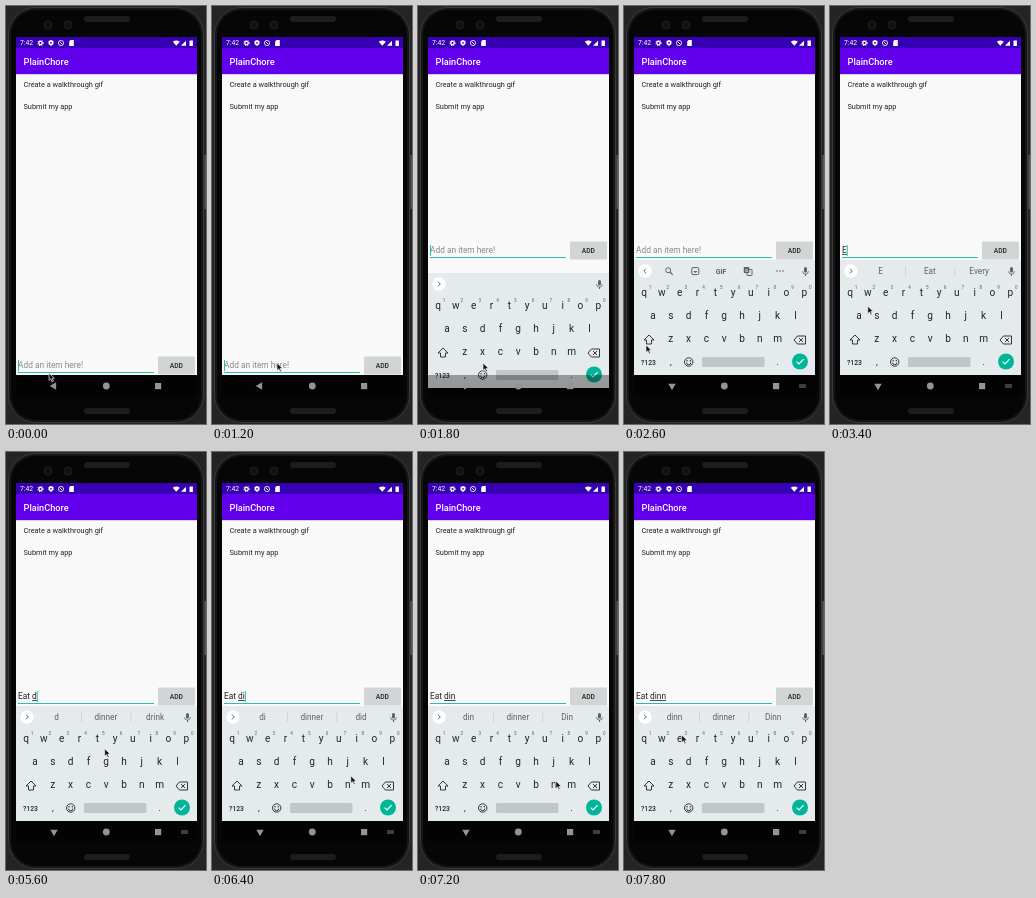
These frames come from a looping animation (200 px wide and 418 px high, 8000 ms). An HTML page with a canvas:

```html
<!DOCTYPE html>
<html lang="en">
<head>
<meta charset="utf-8">
<title>Todo list</title>
<style>
html, body { margin: 0; width: 100%; height: 100%; overflow: hidden; background: #191919; }
canvas { display: block; width: 200px; height: 418px; }
</style>
</head>
<body>
<canvas></canvas>
<script>
const LOOP = 8000, STEP = 200;
const TEAL = '#2bbdb0', INK = '#202528', GREY = '#5b6164', PANEL = '#e5eaec';
const LEFT = 10, WIDTH = 181, NAV_TOP = 369, PANEL_HEIGHT = 115;
const PANEL_TOP = NAV_TOP - PANEL_HEIGHT;

// The story in ms: tap the field, open the toolbar, press shift, then type at an even beat
const TAP_AT = 700, OPEN_AT = 1800, TOOLBAR_AT = 2200, SHIFT_AT = 2700;
const TYPE_AT = 3130, BEAT = 585, TRAVEL = 450;
const PHRASE = 'Eat dinne';
const GUESSES = {
  'E': ['Eat', 'Every'], 'Ea': ['EA', 'Early'], 'Eat': ['East', 'Eating'], 'Eat ': ['at', 'and'],
  'Eat d': ['dinner', 'drink'], 'Eat di': ['dinner', 'did'],
  'Eat din': ['dinner', 'Din'], 'Eat dinn': ['dinner', 'Dinn']
};

const KEY_GAP = 17.8, ROW_GAP = 23;
const keys = {};
['qwertyuiop', 'asdfghjkl', 'zxcvbnm'].forEach((letters, row) => {
  const first = 100.2 - (letters.length - 1) * KEY_GAP / 2;
  [...letters].forEach((letter, i) => {
    keys[letter] = { x: first + i * KEY_GAP, y: PANEL_TOP + 33 + row * ROW_GAP };
  });
});
const SPACE = { x: 109, y: PANEL_TOP + 102 };
const SHIFT = { x: 25, y: keys.z.y + 1 };

const stops = [
  { leave: 0, x: 43, y: 367 },
  { leave: TAP_AT, x: 65, y: 357 },
  { leave: OPEN_AT + STEP / 2, x: 22, y: 339 },
  ...[...PHRASE].map((char, i) => {
    const key = keys[char.toLowerCase()] || SPACE;
    return { leave: i ? TYPE_AT + (i - 1) * BEAT : SHIFT_AT, x: key.x + 2, y: key.y - 4 };
  })
];

const canvas = document.querySelector('canvas');
const c = canvas.getContext('2d');
const dpr = window.devicePixelRatio || 1;
canvas.width = 200 * dpr;
canvas.height = 418 * dpr;

function paint(fill, stroke, width = 1) {
  if (fill) { c.fillStyle = fill; c.fill(); }
  if (stroke) { c.strokeStyle = stroke; c.lineWidth = width; c.stroke(); }
}

function rect(x, y, w, h, color) {
  c.fillStyle = color;
  c.fillRect(x, y, w, h);
}

function round(x, y, w, h, r, ...style) {
  c.beginPath();
  c.roundRect(x, y, w, h, r);
  paint(...style);
}

function arc(x, y, r, from, to, ...style) {
  c.beginPath();
  c.arc(x, y, r, from, to);
  paint(...style);
}

function circle(x, y, r, ...style) {
  arc(x, y, r, 0, Math.PI * 2, ...style);
}

// Vector shape written as path data around a centre
function glyph(x, y, data, ...style) {
  c.save();
  c.translate(x, y);
  const path = new Path2D(data);
  const [fill, stroke, width = 1] = style;
  if (fill) { c.fillStyle = fill; c.fill(path); }
  if (stroke) { c.strokeStyle = stroke; c.lineWidth = width; c.stroke(path); }
  c.restore();
}

function triangle(x, y, r, angle, color) {
  c.beginPath();
  for (let i = 0; i < 3; i++) {
    const a = angle + i * Math.PI * 2 / 3;
    c.lineTo(x + r * Math.cos(a), y + r * Math.sin(a));
  }
  paint(color);
}

function text(str, x, y, size, color, align = 'left', weight = 400) {
  c.font = `${weight} ${size}px Roboto, sans-serif`;
  c.textAlign = align;
  c.fillStyle = color;
  c.fillText(str, x, y);
}

function drawPhone() {
  rect(0, 0, 200, 418, '#242424');
  round(2.5, 1.5, 195, 415, 27, '#161616', '#3a3a3a');
  round(5, 4, 190, 410, 25, '#060606');
  [10, 402].forEach(y => round(78, y, 46, 6, 3, '#1d1d1d'));
  [42, 62].forEach(x => circle(x, 19, 4, '#101112', '#1e2022'));
  rect(198.5, 149, 1.5, 54, '#585858');
}

function drawStatusBar() {
  rect(LEFT, 31, WIDTH, 11, '#3700b3');
  text('7:42', 14, 39.3, 6.8, '#fff');
  c.setLineDash([1, 1.1]);
  circle(34.5, 37, 2.5, null, '#fff', 1.2);
  c.setLineDash([]);
  circle(34.5, 37, 1.7, null, '#fff', 1.2);
  glyph(45, 37, 'M0-3L2.5-2V1L0 3L-2.5 1V-2Z', '#fff');
  circle(45, 36.8, 0.9, '#3700b3');
  circle(55, 37, 2.6, null, '#fff', 0.8);
  glyph(55, 37, 'M-1.4-1.4L1.4 1.4', null, '#fff', 0.9);
  glyph(65.5, 37, 'M-1-3H2.3V3H-2.3V-1.5Z', '#fff');
  glyph(170.3, 39.8, 'M0 0L-3.5-4Q0-6.5 3.5-4Z', '#fff');
  glyph(180, 39.8, 'M0 0H-5L0-5Z', '#fff');
  rect(183.5, 34.5, 3.4, 5.5, '#fff');
}

function drawApp() {
  rect(LEFT, 42, WIDTH, NAV_TOP - 42, '#f9f9f9');
  rect(LEFT, 68, WIDTH, 1, '#d5d3da');
  rect(LEFT, 42, WIDTH, 26, '#6200ee');
  text('PlainChore', 17.5, 58.5, 9.2, '#fff', 'left', 500);
  ['Create a walkthrough gif', 'Submit my app'].forEach((item, i) =>
    text(item, 17.5, 81.4 + 22 * i, 7.35, '#212121'));
}

function drawInput(middle, value, caretOn) {
  const baseline = middle + 2.5;
  text(value || 'Add an item here!', 12, baseline, 8.35, value ? '#212121' : '#8a8a8a');
  const wordStart = 12 + c.measureText(value.slice(0, value.lastIndexOf(' ') + 1)).width;
  const end = 12 + c.measureText(value).width;
  rect(wordStart, baseline + 1, end - wordStart, 0.8, '#212121');
  if (caretOn) rect(end, middle - 5.5, 1, 11, TEAL);
  rect(12, middle + 6.5, 136, 1, TEAL);
  round(152, middle - 9, 37, 18, 1, '#d2d5d6');
  text('ADD', 170.3, middle + 2.2, 6.7, '#202020', 'center', 500);
}

function drawNav(backAngle, keyboardButton) {
  const color = '#929496';
  triangle(48, 380, 4.3, backAngle, color);
  circle(100.3, 380, 3.4, color);
  rect(149, 377, 6.2, 6.2, color);
  if (keyboardButton) round(175, 378, 7, 4, 0.5, '#3c3e40');
}

function drawMic() {
  round(180, 261, 3, 5.6, 1.5, GREY);
  arc(181.5, 265.2, 2.9, 0, Math.PI, null, GREY, 0.8);
  rect(181, 268, 1, 2, GREY);
}

function drawToolbar() {
  circle(44.2, 264.2, 2.5, null, GREY);
  glyph(46, 266, 'M0 0L2.7 2.8', null, GREY, 1.1);
  round(67.8, 261.6, 7, 7, 1.2, null, GREY);
  arc(71.3, 265, 1.8, 0, Math.PI, GREY);
  text('GIF', 97, 267.5, 7, GREY, 'center', 700);
  round(123, 263.5, 5, 6, 0.6, PANEL, GREY);
  round(119.8, 261, 5.5, 6, 0.6, GREY);
  text('G', 122.5, 265.6, 4, '#fff', 'center', 700);
  for (let i = -1; i <= 1; i++) circle(156 + 3 * i, 265, 0.8, GREY);
}

function drawStrip(toolbar, suggestions) {
  circle(21, 265, 6.7, '#fff');
  glyph(21, 265, toolbar ? 'M1-2.3L-1.3 0L1 2.3' : 'M-1-2.3L1.3 0L-1 2.3', null, GREY);
  if (toolbar) drawToolbar();
  suggestions.forEach((word, i) => {
    text(word, 50.5 + 49.3 * i, 268, 8.2, GREY, 'center');
    if (i) rect(25.5 + 49.5 * i, 260, 0.7, 10, '#c5cbce');
  });
  drawMic();
}

function drawKeys(upper) {
  Object.entries(keys).forEach(([letter, { x, y }], i) => {
    text(upper ? letter.toUpperCase() : letter, x, y + 3.3, 10.1, INK, 'center');
    if (i < 10) text((i + 1) % 10, x + 6, y - 4, 4.6, GREY, 'center');
  });
  glyph(SHIFT.x, SHIFT.y, 'M0-5L5 0H2.5V4H-2.5V0H-5Z', upper && INK, INK, 0.9);
  glyph(176, SHIFT.y, 'M-6 0L-2.6-4H5.5V4H-2.6ZM-1-2L3 2M3-2L-1 2', null, INK, 0.9);

  text('?123', 24.5, 358.5, 6.8, INK, 'center', 500);
  text(',', 47, 358.5, 9, INK, 'center');
  text('.', 153.5, 358.5, 9, INK, 'center');
  circle(64.7, 356, 4.2, null, INK, 0.9);
  [-1.6, 1.6].forEach(dx => circle(64.7 + dx, 354.8, 0.7, INK));
  arc(64.7, 356.6, 2.1, 0, Math.PI, null, INK, 0.9);
  round(SPACE.x - 31, SPACE.y - 5, 62.5, 10, 1.5, '#c0c6c9');
  circle(176, 355.5, 8, '#00b698');
  glyph(176, 355.5, 'M-3.4 0.2L-1 2.5L3.6-2.3', null, '#fff', 1.1);
}

function drawKeyboard(t, suggestions) {
  rect(LEFT, PANEL_TOP, WIDTH, PANEL_HEIGHT, PANEL);
  const idle = !suggestions.length;
  drawStrip(idle && t >= TOOLBAR_AT, suggestions);
  drawKeys(idle && t >= SHIFT_AT);
}

function drawPointer(t) {
  const i = stops.findLastIndex(stop => stop.leave <= t);
  const from = stops[Math.max(i - 1, 0)], to = stops[i];
  const k = 1 - (1 - Math.min((t - to.leave) / TRAVEL, 1)) ** 1.5;
  glyph(from.x + (to.x - from.x) * k, from.y + (to.y - from.y) * k,
    'M0 0V7.4L1.8 5.9L3.1 8.8L4.4 8.2L3.1 5.4L5.4 5.2Z', '#111', '#f2f2f2', 0.7);
}

function render(t) {
  c.setTransform(dpr, 0, 0, dpr, 0, 0);
  const open = t >= OPEN_AT;
  const sliding = open && t < OPEN_AT + STEP;
  const count = Math.max(0, Math.floor((t - TYPE_AT) / BEAT) + 1);
  const value = PHRASE.slice(0, count);
  const suggestions = value ? [value.split(' ').pop() || 'the', ...GUESSES[value]] : [];
  const touchedAt = count ? TYPE_AT + (count - 1) * BEAT : open ? OPEN_AT : 0;

  drawPhone();
  drawStatusBar();
  drawApp();
  drawInput(359.5 - (open ? PANEL_HEIGHT : 0), value, (t - touchedAt) % 1000 < 500);

  // While it slides in, the keyboard shows through the darkened navigation bar
  const slide = sliding ? 13 : 0;
  rect(LEFT, NAV_TOP, WIDTH, 21, '#030303');
  if (open) {
    c.save();
    c.translate(0, slide);
    drawKeyboard(t, suggestions);
    c.restore();
    rect(LEFT, NAV_TOP, WIDTH, slide, 'rgba(0, 0, 0, 0.35)');
  }
  drawNav(sliding ? 0 : open ? Math.PI / 2 : Math.PI, open && !sliding);
  drawPointer(t);
}

function tick() {
  const t = performance.now() % LOOP;
  render(Math.floor(t / STEP) * STEP);
  requestAnimationFrame(tick);
}
tick();
</script>
</body>
</html>
```
